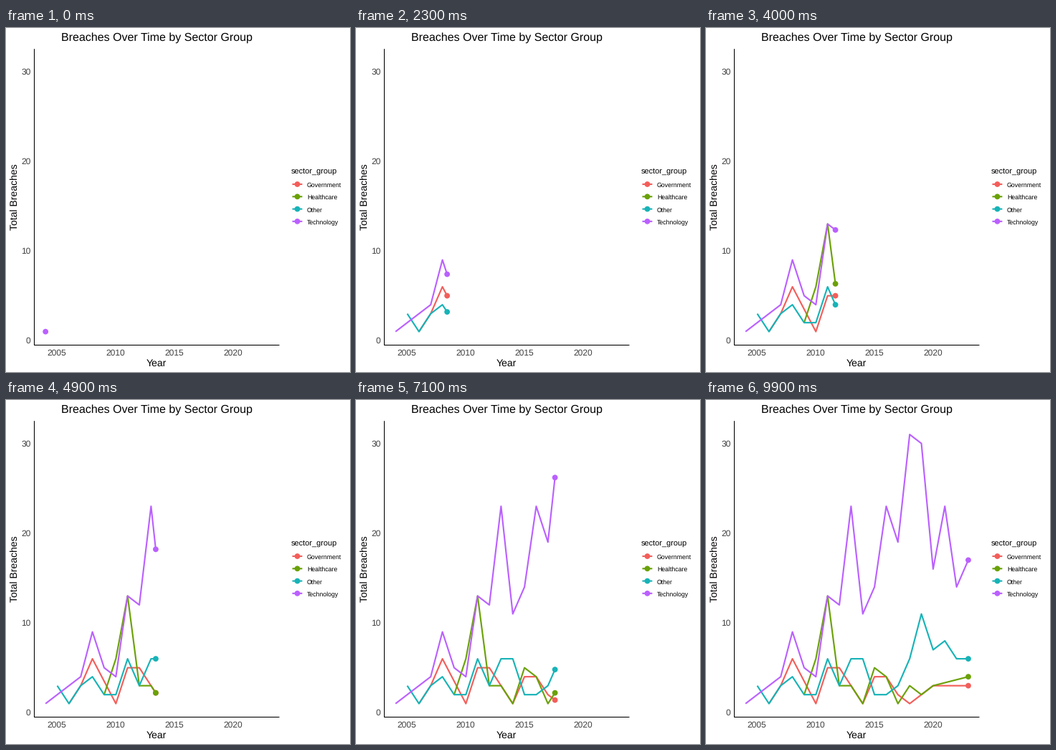
A matplotlib script that plays this animation: 480x480 px, repeating every 10 s.

```python
import matplotlib.pyplot as plt
import numpy as np
from matplotlib.animation import FuncAnimation
from matplotlib.patches import Circle

plt.rcParams.update({
    "font.family": "Liberation Sans",
    "text.hinting": "none",
    "path.simplify": False,
})

SIZE, DPI = 480, 72          # at 72 dpi one point is one pixel
FRAMES, INTERVAL = 100, 100
FIRST, LAST = 2004, 2023
LEFT, RIGHT, TOP, BOTTOM = 39.5, 381.5, 29.2, 442.5
MID_X, MID_Y = (LEFT + RIGHT) / 2, (TOP + BOTTOM) / 2
INK, TICK = "black", "#404040"
RADIUS, WIDTH = 3.9, 2.13

# name: (colour, first year, totals); one total per year, the last in LAST
SERIES = {
    "Government": ("#F35E5A", 2006,
                   [1, 3, 6, 3.5, 1, 5, 5, 3, 1, 4, 4, 2, 1, 2, 3, 3]),
    "Healthcare": ("#6AA106", 2009,
                   [2, 6, 13, 3, 3, 1, 5, 4, 1, 3, 2, 3, 4]),
    "Other": ("#17B3B7", 2005,
              [3, 1, 3, 4, 2, 2, 6, 3, 6, 6, 2, 2, 3, 6, 11, 7, 8, 6, 6]),
    "Technology": ("#BA60FF", 2004,
                   [1, 2, 3, 4, 9, 5, 4, 13, 12, 23, 11, 14, 23, 19, 31, 30,
                    16, 23, 14, 17]),
}


def px(year):
    return 55.15 + 16.36 * (np.asarray(year) - FIRST)


def py(total):
    return 436.2 - 12.52 * np.asarray(total)


fig = plt.figure(figsize=(SIZE / DPI, SIZE / DPI), dpi=DPI, facecolor="white")
ax = fig.add_axes([0, 0, 1, 1])
ax.set(xlim=(0, SIZE), ylim=(SIZE, 0))
ax.axis("off")


def label(x, y, s, size, color=INK, ha="center", rotation=0):
    ax.text(x, y, s, fontsize=size, color=color, ha=ha, va="baseline",
            rotation=rotation, rotation_mode="anchor")


def stroke(xs, ys, color, width=WIDTH):
    return ax.plot(xs, ys, color=color, lw=width, zorder=2, snap=False,
                   solid_capstyle="butt", solid_joinstyle="round")[0]


def dot(x, y, color):
    return ax.add_patch(Circle((x, y), RADIUS, fc=color, lw=0, zorder=3))


def draw_axes():
    stroke([LEFT, LEFT, RIGHT], [TOP, BOTTOM, BOTTOM], INK, 1.07)
    for year in range(2005, 2021, 5):
        label(px(year) - 0.4, 457.3, str(year), 12, TICK)
    for total in range(0, 31, 10):
        label(34.7, py(total) + 4, str(total), 12, TICK, ha="right")
    label(MID_X, 18, "Breaches Over Time by Sector Group", 16)
    label(MID_X - 0.5, 471.4, "Year", 14)
    label(16, MID_Y, "Total Breaches", 14, rotation=90)


def draw_legend():
    label(397.8, 203, "sector_group", 11, ha="left")
    for k, (name, (color, *_)) in enumerate(SERIES.items()):
        y = 218 + 17.28 * k
        stroke([399.5, 413.4], [y, y], color)
        dot(406.5, y, color)
        label(420, y + 4, name, 8.8, ha="left")


class Trace:
    """A line that is revealed step by step behind a moving dot."""

    def __init__(self, color, start, totals):
        years = start + np.arange(len(totals))
        years[-1] = LAST
        self.x, self.y = px(years), py(totals)
        share = (years - FIRST) / (LAST - FIRST)
        self.steps = np.round(share * (FRAMES - 1))
        self.line = stroke([], [], color)
        self.head = dot(0, 0, color)

    def show(self, i):
        n = np.searchsorted(self.steps, i, side="right")
        x = np.interp(i, self.steps, self.x)
        y = np.interp(i, self.steps, self.y)
        self.line.set_data([*self.x[:n], x], [*self.y[:n], y])
        self.head.center = x, y
        self.line.set_visible(n > 0)
        self.head.set_visible(n > 0)


draw_axes()
draw_legend()
traces = [Trace(*spec) for spec in SERIES.values()]


def draw(i):
    for trace in traces:
        trace.show(i)
    return [a for t in traces for a in (t.line, t.head)]


anim = FuncAnimation(fig, draw, frames=FRAMES, interval=INTERVAL,
                     repeat=True, repeat_delay=0, blit=False)
plt.show()
```
